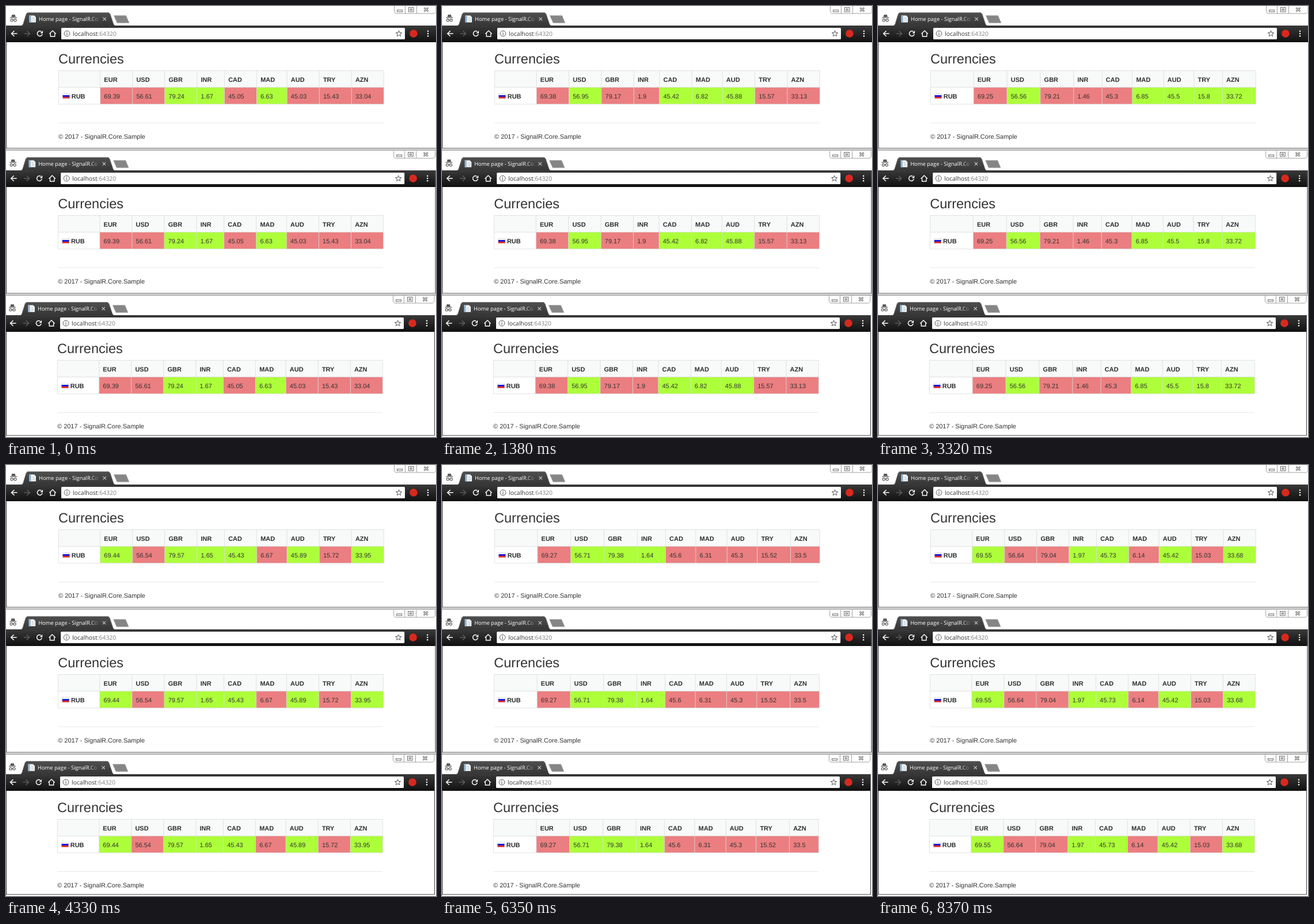
These frames come from a looping animation (747 by 750 pixels, 8670 ms). An HTML page with a canvas:

```html
<!DOCTYPE html>
<html lang="en">
<head>
<meta charset="utf-8">
<title>Currencies</title>
<style>
html, body { margin: 0; width: 100%; height: 100%; overflow: hidden; background: #fff; }
canvas { display: block; }
</style>
</head>
<body>
<canvas id="stage" width="747" height="750"></canvas>
<script>
const ctx = document.getElementById('stage').getContext('2d');
const LOOP = 8670;
const K = 0.785; // page zoom
const ARIAL = '"Liberation Sans", Arial, sans-serif';
const UI = '"Open Sans", "Noto Sans", sans-serif';
const CODES = ['EUR', 'USD', 'GBR', 'INR', 'CAD', 'MAD', 'AUD', 'TRY', 'AZN'];
const START = [70, 57, 79, 1, 46, 6, 46, 16, 34];
const RATES = [
  [0, '69.39 56.61 79.24 1.67 45.05 6.63 45.03 15.43 33.04'],
  [370, '69.39 56.42 79.53 1.9 45.21 6.37 45.46 15.81 33.58'],
  [1380, '69.38 56.95 79.17 1.9 45.42 6.82 45.88 15.57 33.13'],
  [2390, '69.67 56.31 79.46 1.74 45.61 6.37 45.18 15.29 33.42'],
  [3320, '69.25 56.56 79.21 1.46 45.3 6.85 45.5 15.8 33.72'],
  [4330, '69.44 56.54 79.57 1.65 45.43 6.67 45.89 15.72 33.95'],
  [5340, '69.42 56.49 79.19 1.42 45.79 6.48 45.5 15.74 33.96'],
  [6350, '69.27 56.71 79.38 1.64 45.6 6.31 45.3 15.52 33.5'],
  [7360, '69.03 56.92 79.65 1.32 45.4 6.62 45.1 15.44 33.03'],
  [8370, '69.55 56.64 79.04 1.97 45.73 6.14 45.42 15.03 33.68']
];
const WINDOWS = [
  { x: 0, y: 0, end: 247.5, right: 748 },
  { x: -0.8, y: 252, end: 500, right: 746.5 },
  { x: -2, y: 504, end: 747.3, right: 745 }
];

function rect(x, y, w, h, color) {
  ctx.fillStyle = color;
  ctx.fillRect(x, y, w, h);
}

function path(points, closed) {
  ctx.beginPath();
  points.forEach(([x, y], i) => i ? ctx.lineTo(x, y) : ctx.moveTo(x, y));
  if (closed) ctx.closePath();
}

function line(points, color, width = 1, closed = false) {
  path(points, closed);
  ctx.strokeStyle = color;
  ctx.lineWidth = width;
  ctx.stroke();
}

function shape(points, color) {
  path(points, true);
  ctx.fillStyle = color;
  ctx.fill();
}

function disc(x, y, r, color) {
  ctx.beginPath();
  ctx.arc(x, y, r, 0, 7);
  ctx.fillStyle = color;
  ctx.fill();
}

function ring(x, y, r, color, width = 1, from = 0, to = Math.PI * 2) {
  ctx.beginPath();
  ctx.arc(x, y, r, from, to);
  ctx.strokeStyle = color;
  ctx.lineWidth = width;
  ctx.stroke();
}

function text(str, x, y, size, color, family = ARIAL, weight = '') {
  ctx.font = `${weight} ${size}px ${family}`;
  ctx.fillStyle = color;
  ctx.fillText(str, x, y);
}

function shade(y0, y1, top, bottom) {
  const g = ctx.createLinearGradient(0, y0, 0, y1);
  g.addColorStop(0, top);
  g.addColorStop(1, bottom);
  return g;
}

// Width at 14px, measured large to avoid rounding
function width(str, bold) {
  ctx.font = `${bold ? 'bold' : ''} 140px ${ARIAL}`;
  return ctx.measureText(str).width / 10;
}

// Automatic table layout: spare room is shared in proportion to content
function columnEdges(values) {
  const wide = [16 + width(' ') + width('RUB', true)]
    .concat(values.map((v, i) => Math.max(width(v), width(CODES[i], true))))
    .map(w => w + 17);
  const total = wide.reduce((a, b) => a + b);
  let x = 91.3;
  return [x].concat(wide.map(w => x += w / total * 565));
}

const states = RATES.map(([at, row], n) => {
  const values = row.split(' ');
  const before = n ? RATES[n - 1][1].split(' ') : START;
  return { at, values, up: values.map((v, i) => +v > +before[i]), edges: columnEdges(values) };
});

function incognito() {
  const c = '#555';
  shape([[9.3, 19.2], [10.6, 14.8], [13, 15.4], [15.4, 14.8], [16.7, 19.2]], c);
  rect(7, 19.6, 12, 1.2, c);
  ring(10, 24.7, 2.1, c, 1.1);
  ring(16, 24.7, 2.1, c, 1.1);
  line([[12, 24.2], [14, 24.2]], c);
}

function tab() {
  const outline = [[27, 34.5], [29.5, 32], [35, 14], [37.5, 11.5], [178.5, 11.5], [181, 14], [187, 32], [189.5, 34.5]];
  shape(outline, shade(11, 34, '#505050', '#363636'));
  line(outline, '#777', 0.6);
  shape([[187.5, 16.8], [208.5, 16.8], [213.8, 29.3], [193, 29.3]], '#858585');
  line([[187.5, 16.8], [208.5, 16.8], [213.8, 29.3], [193, 29.3]], '#a2a2a2', 0.8, true);

  shape([[40.5, 16.5], [49, 16.5], [52, 19.5], [52, 28.5], [40.5, 28.5]], '#f1f4f6');
  rect(40.5, 16.5, 3, 12, '#8fb4d4');
  line([[45.5, 20.5], [49, 20.5]], '#b4c2cc', 0.8);
  line([[45.5, 23], [50.5, 23]], '#b4c2cc', 0.8);
  line([[45.5, 25.5], [50.5, 25.5]], '#b4c2cc', 0.8);

  ctx.save();
  ctx.beginPath();
  ctx.rect(56, 12, 104.5, 22);
  ctx.clip();
  const fade = ctx.createLinearGradient(146, 0, 161, 0);
  fade.addColorStop(0, '#fff');
  fade.addColorStop(1, '#666');
  text('Home page - SignalR.Core', 57, 26, 9.35, fade, UI);
  ctx.restore();
  line([[168.5, 19.8], [174, 25.3]], '#d0d0d0', 1.1);
  line([[174, 19.8], [168.5, 25.3]], '#d0d0d0', 1.1);
}

function windowButtons(right) {
  const c = '#a0a0a0', ink = '#6b6b6b', r = Math.min(right - 1, 748);
  line([[674.5, 0], [674.5, 10.5], [677, 13], [r - 2.5, 13], [r, 10.5], [r, 0]], c);
  line([[693.5, 0], [693.5, 13]], c);
  line([[713.5, 0], [713.5, 13]], c);
  ctx.lineWidth = 1;
  ctx.strokeStyle = ink;
  ctx.strokeRect(679.5, 7, 9, 3);
  ctx.strokeRect(699.5, 2.5, 8.5, 7.5);
  ctx.strokeRect(702.2, 5, 3, 2.5);
  line([[726.5, 3], [733.5, 9.5]], ink, 2.6);
  line([[733.5, 3], [726.5, 9.5]], ink, 2.6);
  line([[726.5, 3], [733.5, 9.5]], '#fff', 1);
  line([[733.5, 3], [726.5, 9.5]], '#fff', 1);
}

function arrow(x, dir, color) {
  line([[x - 5 * dir, 48], [x + 5 * dir, 48]], color, 1.5);
  line([[x, 43.2], [x - 5 * dir, 48], [x, 52.8]], color, 1.5);
}

function star(x, y) {
  const points = Array.from({ length: 10 }, (_, i) => {
    const a = i * Math.PI / 5 - Math.PI / 2, r = i % 2 ? 2.3 : 5.4;
    return [x + r * Math.cos(a), y + r * Math.sin(a)];
  });
  line(points, '#555', 1, true);
}

function toolbar(right) {
  rect(0, 34, right, 29, shade(34, 63, '#393939', '#101010'));
  arrow(14.5, 1, '#fff');
  arrow(36.5, -1, '#5c5c5c');
  ring(58.8, 48, 4.4, '#fff', 1.5, 0.2, 5.3);
  shape([[64, 42.8], [64, 47.4], [59.4, 47.4]], '#fff');
  line([[75.3, 48.6], [81, 43], [86.7, 48.6]], '#fff', 1.4);
  line([[77.3, 47.5], [77.3, 53], [84.7, 53], [84.7, 47.5]], '#fff', 1.4);

  ctx.beginPath();
  ctx.roundRect(96, 38, 597, 20, 1.5);
  ctx.fillStyle = '#fff';
  ctx.fill();
  ring(106, 48, 4.9, '#5a5a5a', 1);
  rect(105.4, 47.2, 1.2, 3.6, '#5a5a5a');
  rect(105.4, 45, 1.2, 1.2, '#5a5a5a');
  text('localhost', 116, 51.8, 10.4, '#333', UI);
  const w = ctx.measureText('localhost').width;
  text(':64320', 116 + w, 51.8, 10.4, '#808080', UI);
  star(682.5, 48.3);
  disc(708, 48, 6.8, '#d8291f');
  for (const y of [43.7, 48, 52.3]) disc(733, y, 1.25, '#fff');
}

function flag() {
  rect(98.2, 152.3, 12.6, 8.8, '#ccc');
  rect(98.8, 152.9, 11.4, 2.4, '#fff');
  rect(98.6, 155.2, 11.8, 2.9, '#1212d8');
  rect(98.6, 158.1, 11.8, 2.6, '#e32222');
}

function table({ values, up, edges }) {
  const top = 112.5, mid = 141.6, low = 170.8;
  const left = edges[0], right = edges[10], border = '#d9dbdb';
  rect(left, top, right - left, mid - top, '#f8f9f9');
  values.forEach((v, i) => {
    rect(edges[i + 1], mid, edges[i + 2] - edges[i + 1], low - mid, up[i] ? '#adff3a' : '#eb7e80');
  });
  for (const x of edges) line([[x, top], [x, low]], border, K);
  for (const y of [top, mid, low]) line([[left, y], [right, y]], border, K);
  values.forEach((v, i) => {
    const x = edges[i + 1] + 8.5 * K;
    text(CODES[i], x, 131.5, 14 * K, '#2b2e30', ARIAL, 'bold');
    text(v, x, 160.6, 14 * K, '#333');
  });
  flag();
  text('RUB', 113.7, 160.6, 14 * K, '#2b2e30', ARIAL, 'bold');
}

function browser(win, state) {
  ctx.save();
  ctx.translate(win.x, win.y);
  const right = win.right - win.x;
  const bottom = win.end - win.y;
  windowButtons(right);
  incognito();
  tab();
  toolbar(right);
  text('Currencies', 91, 100, 30 * K, '#333');
  table(state);
  line([[91, 203.5], [656, 203.5]], '#e9e9e9', 1);
  text('© 2017 - SignalR.Core.Sample', 91, 231, 14 * K, '#333');
  ctx.restore();
  const edge = Math.max(0.5, win.x + 0.5);
  line([[edge, win.y + 62], [edge, win.y + bottom], [win.right - 0.5, win.y + bottom], [win.right - 0.5, win.y + 34]], '#4a4a4a', 1.1);
}

function draw(t) {
  const state = states.filter(s => s.at <= t).pop();
  ctx.textRendering = 'geometricPrecision';
  rect(0, 0, 747, 750, '#fff');
  for (const win of WINDOWS) browser(win, state);
  line([[0, 250.5], [747, 250.5]], '#555', 1.1);
  line([[0, 503], [747, 503]], '#555', 1.1);
}

const began = performance.now();
function tick() {
  draw((performance.now() - began) % LOOP);
  requestAnimationFrame(tick);
}
tick();
</script>
</body>
</html>
```
